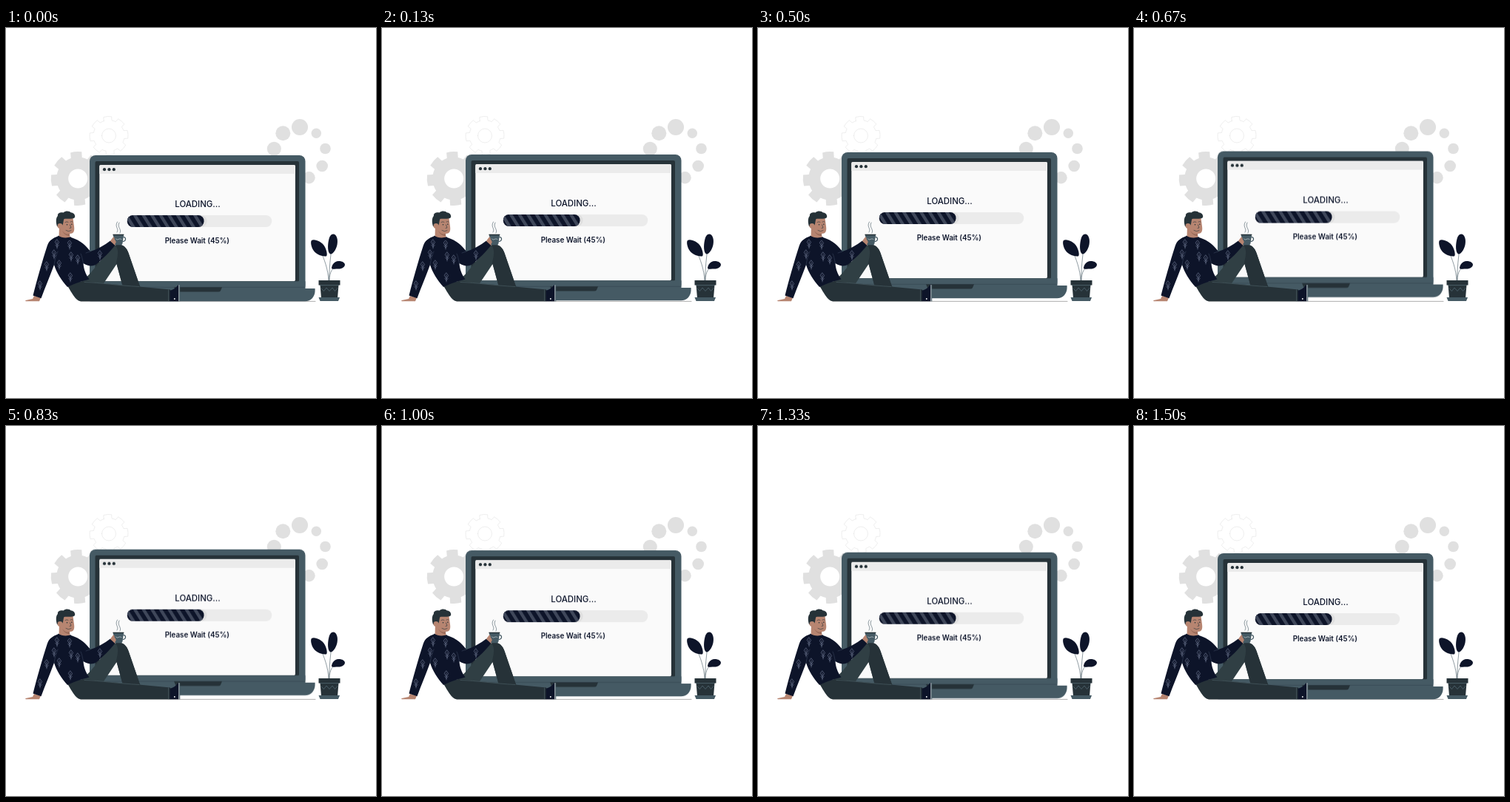
Write an HTML page that moves like this. It is 500 by 500 pixels and loops after 1.54 s.

```html
<!DOCTYPE html>
<html lang="en">
<head>
<meta charset="utf-8">
<title>Loading</title>
<style>
  html, body { margin: 0; width: 100%; height: 100%; overflow: hidden; background: #fff; }
  svg { display: block; width: 100vw; height: 100vh; }
  text { font-family: Inter, "Open Sans", sans-serif; text-anchor: middle; fill: #0d152b; }
  .title { font-size: 11.4px; font-weight: 500; }
  .wait { font-size: 9.8px; font-weight: 600; }
  .slate { fill: #455a64; }
  .dark { fill: #263238; }
  .pale { fill: #e0e0e0; }
  .navy { fill: #0d1429; }
  .skin { fill: #b78571; }
  .thin { fill: none; stroke-width: .6; stroke-linecap: round; stroke-linejoin: round; }
  #laptop { animation: float 1540ms linear infinite; }
  @keyframes float {
    0%, 96.75%, 100% { transform: translateY(0); }
    48.05% { transform: translateY(-6px); }
  }
</style>
</head>
<body>
<svg viewBox="0 0 500 500">
  <defs>
    <pattern id="stripes" width="11.6" height="40" x="7.5" patternUnits="userSpaceOnUse"
             patternTransform="translate(164 253) skewX(32)">
      <rect width="5" height="40" fill="#3f475a"/>
    </pattern>
    <g id="motif" class="thin" stroke="#76809a">
      <path d="M0 -5L2.6 -1.5L0 3L-2.6 -1.5ZM0 -2V7M0 5L2.2 2.5M0 5L-2.2 2.5"/>
    </g>
  </defs>

  <!-- background -->
  <path id="bigGear" class="pale" fill-rule="evenodd"/>
  <path id="smallGear" class="thin" stroke="#e2e2e2"/>
  <g class="pale">
    <circle cx="397" cy="134" r="11"/>
    <circle cx="374.3" cy="142.3" r="10"/>
    <circle cx="362.3" cy="163.2" r="9.5"/>
    <circle cx="419.3" cy="142.2" r="6.7"/>
    <circle cx="431.5" cy="163" r="7.3"/>
    <circle cx="427.2" cy="186.5" r="7.8"/>
    <circle cx="409.5" cy="202.2" r="8.2"/>
  </g>
  <path class="thin" stroke="#777" d="M101 369.4H418"/>

  <g id="laptop">
    <rect class="slate" x="113" y="172" width="291.5" height="184" rx="8"/>
    <rect class="dark" x="120.5" y="180" width="275.5" height="163" rx="2"/>
    <rect x="126.3" y="185" width="264.6" height="157.3" rx="2" fill="#fafafa"/>
    <path d="M126.3 197V187a2 2 0 0 1 2-2H389a2 2 0 0 1 2 2V197Z" fill="#ebebeb"/>
    <g class="dark">
      <circle cx="133" cy="191.2" r="2.1"/>
      <circle cx="139.4" cy="191.2" r="2.1"/>
      <circle cx="145.8" cy="191.2" r="2.1"/>
    </g>
    <rect class="slate" x="113" y="342.3" width="291.5" height="12"/>
    <path class="slate" d="M101 352H417.6V355C417.6 363 412 369.3 404 369.3H115C107 369.3 101 363 101 355Z"/>
    <path class="thin" stroke="#34464f" d="M115 350.3H404"/>
    <path class="dark" d="M227 350.3H292L290 355Q289.3 356.5 287 356.5H232Q229.700 356.5 229 355Z"/>

    <text class="title" x="259" y="242.2">LOADING...</text>
    <rect x="163.8" y="253" width="195.400" height="16" rx="8" fill="#ebebeb"/>
    <rect x="250" y="253" width="21.500" height="16" rx="8" fill="#e0e0e0"/>
    <rect class="navy" x="163.8" y="253" width="103.700" height="16" rx="7.500"/>
    <rect x="163.8" y="253" width="103.700" height="16" rx="7.500" fill="url(#stripes)"/>
    <text class="wait" x="258.300" y="291.200">Please Wait (45%)</text>
  </g>

  <!-- plant -->
  <g>
    <path class="thin" stroke="#455a64" d="M436 341C435 326 431 314 424 299M436.500 341C437 325 438 310 441 292M437 341C437 330 441 323 450 320"/>
    <g class="navy">
      <path d="M413 287C416 284.500 427 288 431 296C434 302 434.500 308 432.500 308.500C426 309 417 305 414 298C412 293 411.500 289 413 287Z"/>
      <path d="M442 278.500C447 278.500 449 286 447.500 293C446 300 441.500 306 438.500 305.500C434.500 304 434.500 294 436 287C437 282 439 278.500 442 278.500Z"/>
      <path d="M440 325C440 320 444 315.500 449 315C454 314.700 458 317 458 320C457.500 324 452 326 448 325.500C444 325 442 326.500 440 325Z"/>
    </g>
    <path class="dark" d="M424.500 347H449.500L448 365H426Z"/>
    <rect class="dark" x="422.500" y="341" width="29" height="6.500"/>
    <path class="thin" stroke="#607985" d="M425 347.600H449M426 352L429.500 355.500L433 351L437 355.500L441 351L444.500 355.500L448 351.500"/>
    <path class="slate" d="M422.500 364H451L449 369H424.500Z"/>
  </g>

  <!-- legs -->
  <path fill="#303f44" d="M96 346C110 339 119 325 134 306C141 297 146 292.500 152 292.800C159 293 163 297 165.500 304L182 352H158.500L149.500 319L130 348L105 352Z"/>
  <path class="dark" d="M152 292.800C159 293 163 297 165.500 304L182 352H158.500L149 317C151 308 153 300 148 293.500Z"/>
  <path class="dark" d="M83 348C95 342 109 341 121 344L222 353.500V369.300H102C96 369.300 92 364 83 348Z"/>
  <path class="thin" stroke="#4f646b" d="M106 343.500C128 344 150 348 180 349.500M219.500 354V369"/>
  <path class="navy" d="M221.500 354.500C227 354 230 350 233.500 346.500V369.300H221.500Z"/>
  <path d="M233.500 346.500L235.200 347.500V369.300H233.500Z" fill="#455a64"/>
  <path class="thin" stroke="#fff" d="M233.800 347.500V369"/>
  <circle cx="227.800" cy="366" r=".9" fill="#fff"/>

  <!-- supporting hand, body, sleeves -->
  <path class="skin" d="M38 362L47 364.500L45 369.300H27C25.500 369 26 367.800 29 367.500L36 366Z"/>
  <path class="navy" d="M71 281C63 284 58 287 55.500 295C49 315 42 340 36.500 361.500L47.500 365.200C53 350 60 334 65 320C68 330 75 341 83 350C95 344 104 342 112.500 339.500C107 332 105 325 104.500 318C110 321.500 116 322.500 121 320C131 312 141 302 147.500 293.500L141 287.500C133 294 123 299 114 302C108 294 101 287 88 283Z"/>
  <path class="thin" stroke="#38435c" d="M65 320C66 313 68 307 70 302M104.500 318C103 312 103 309 101 305M114 302L108 304"/>
  <g id="motifs"></g>

  <!-- head -->
  <path class="skin" d="M72 266L71.500 283C76 287 83 287 86.500 283L86 278C91 278 93 275 92 268L90.500 257L77 255Z"/>
  <path d="M76 274C79 278 82 279 86 278.300V281C81 281 78 278 76 274Z" fill="#9a6b59"/>
  <path class="navy" d="M70.500 280.500C75 283.500 82 284.500 87.500 282L88.500 286C82 288.500 75 287.500 70 285Z"/>
  <path class="dark" d="M69 268C67 262 67.500 256 70 254C69 250 74 248.500 77.500 249.500C81 246.500 86 247.500 88 249.500C92 249.500 94.500 254 92.500 256.500C88 259 83 257 78.500 258C77 261 78 265 75.500 267.500L74 270Z"/>
  <circle class="skin" cx="73" cy="267.500" r="3.400"/>
  <g class="thin" stroke="#263238">
    <path d="M80 262.500Q82 261 84 262.300M87 262Q88.500 261 90 262M86.500 266L88 270L86 270.500M81 273.500Q84.500 276 88 273.700"/>
  </g>
  <g class="dark">
    <circle cx="82.500" cy="265.700" r=".8"/>
    <circle cx="88.800" cy="265.200" r=".8"/>
  </g>

  <!-- cup -->
  <path class="skin" d="M141 288L145.500 282.500L149 286L154 288.500L153 292L147 293.500Z"/>
  <path class="slate" d="M144.800 279.500H159L157.500 291Q157 293.200 155 293.200H149Q147 293.200 146.500 291Z"/>
  <path d="M158 282.500C163 282 162.500 288.500 157.500 288.500" fill="none" stroke="#455a64" stroke-width="1.300"/>
  <path class="dark" d="M144.500 278.700H159.300V280.200H144.500Z"/>
  <path class="thin" stroke="#d0d8dc" d="M148.500 285Q150 287 152 285.500T156 285.500"/>
  <path class="skin" d="M141.500 287L145 282.500Q147 282.500 146.500 285L148 287.500Q149.500 289 148 291L146.500 293Z"/>
  <path class="thin" stroke="#455a64" d="M150 276C153.500 271 146 269 150.500 262M154 277C157 272 149.500 269.500 153 263"/>
</svg>

<script>
  const $ = id => document.getElementById(id);

  function gear(cx, cy, tip, root, hole, turn) {
    const at = (r, deg) => {
      const a = (deg + turn) * Math.PI / 180;
      return (cx + r * Math.sin(a)).toFixed(2) + ' ' + (cy - r * Math.cos(a)).toFixed(2);
    };
    let d = 'M' + at(root, -15);
    for (let a = 0; a < 360; a += 45) {
      d += `L${at(tip, a - 12)}A${tip} ${tip} 0 0 1 ${at(tip, a + 12)}` +
           `L${at(root, a + 15)}A${root} ${root} 0 0 1 ${at(root, a + 30)}`;
    }
    return d + `ZM${cx - hole} ${cy}a${hole} ${hole} 0 1 0 ${2 * hole} 0a${hole} ${hole} 0 1 0 ${-2 * hole} 0Z`;
  }

  $('bigGear').setAttribute('d', gear(97.2, 203.5, 36.5, 29, 13, -4));
  $('smallGear').setAttribute('d', gear(139, 145.5, 26, 21, 9.5, -4));

  const spots = [[69, 291], [86, 292], [65, 305], [88, 308], [97, 312], [55, 321],
                 [72, 319], [46, 347], [87, 336], [127, 306]];
  $('motifs').innerHTML = spots.map(([x, y]) => `<use href="#motif" x="${x}" y="${y}"/>`).join('');
</script>
</body>
</html>
```
